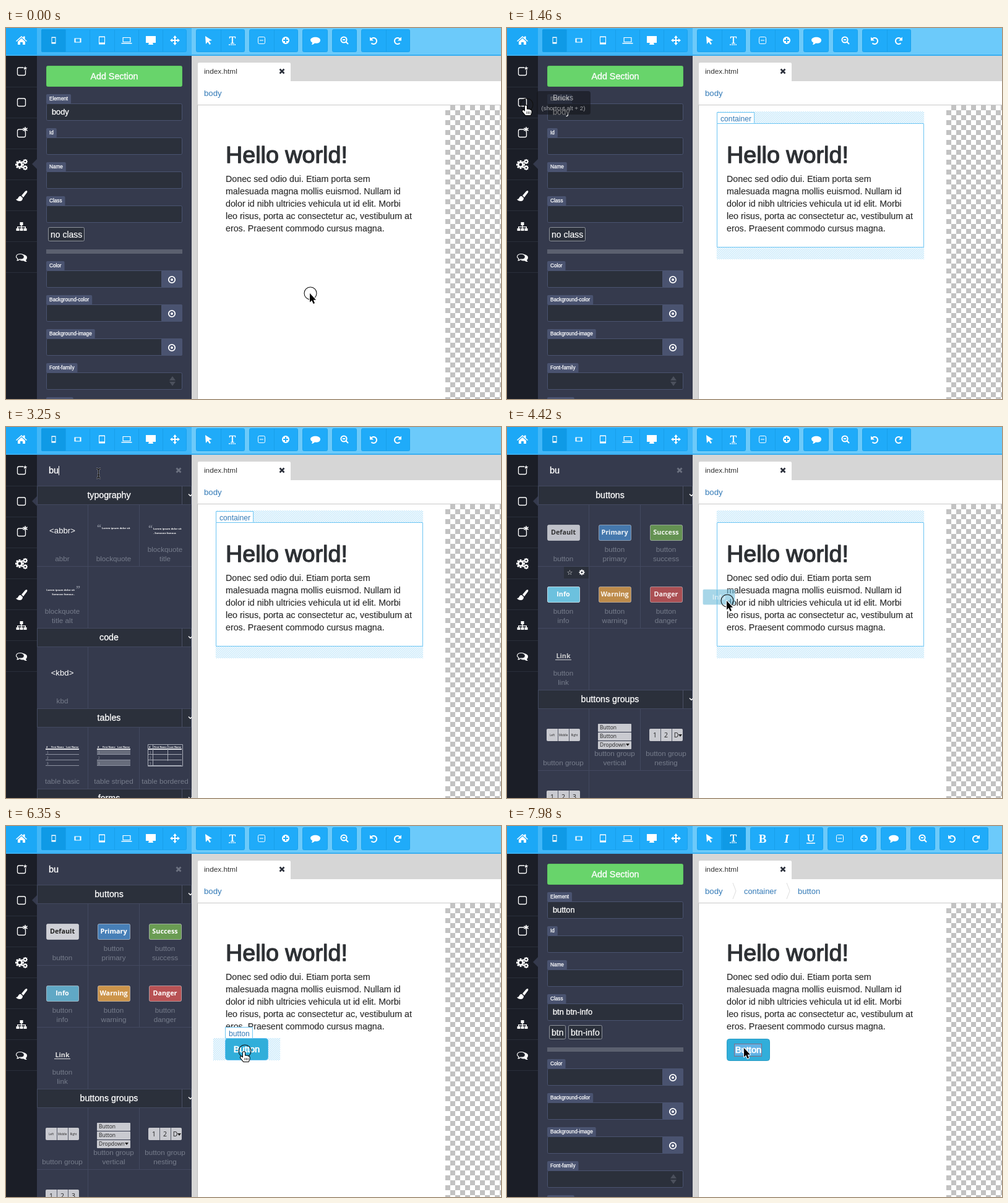
An HTML page with a canvas for the animation above (8000 ms loop, 800 px wide and 600 px high).

```html
<!DOCTYPE html>
<html lang="en">
<head>
<meta charset="utf-8">
<title>Page builder</title>
<style>
html, body { margin: 0; width: 100%; height: 100%; overflow: hidden; background: #fff; }
canvas { display: block; }
</style>
</head>
<body>
<canvas id="stage" width="800" height="600"></canvas>
<script>
const c = document.getElementById('stage').getContext('2d');
const LOOP = 8000, STEP = 147.5;
const SANS = '"Liberation Sans", Arial, sans-serif', HUMANIST = '"Open Sans", sans-serif';
const PANEL = '#353a4d', DARK = '#2b303b', EDGE = '#4a5370', SKY = '#6cc5f3', LINK = '#337ab7';

function rect(x, y, w, h, fill, stroke, radius = 0) {
  c.beginPath();
  if (stroke) c.roundRect(x + .5, y + .5, w - 1, h - 1, radius);
  else c.roundRect(x, y, w, h, radius);
  if (fill) { c.fillStyle = fill; c.fill(); }
  if (stroke) { c.strokeStyle = stroke; c.lineWidth = 1; c.stroke(); }
}
function text(s, x, y, size, color, { align = 'left', bolder = 0, font = SANS, style = '' } = {}) {
  c.font = `${style} ${size}px ${font}`;
  c.textAlign = align;
  c.fillStyle = c.strokeStyle = color;
  c.lineJoin = 'round';
  c.fillText(s, x, y);
  if (bolder) { c.lineWidth = bolder; c.strokeText(s, x, y); }
}
const center = (s, x, y, size, color, more) => text(s, x, y, size, color, { align: 'center', ...more });
const widthOf = (s, size) => { c.font = `${size}px ${SANS}`; return c.measureText(s).width; };

// Draws an SVG path at (x, y); filled unless a line width is given.
function icon(x, y, d, color = '#fff', line = 0, flip = 1) {
  c.save();
  c.translate(x, y);
  c.scale(flip, 1);
  const path = new Path2D(d);
  c.fillStyle = c.strokeStyle = color;
  c.lineWidth = line;
  c.lineJoin = 'round';
  if (line) c.stroke(path); else c.fill(path, 'evenodd');
  c.restore();
}
function disc(x, y, r, fill, line = 0) {
  c.beginPath();
  c.arc(x, y, r, 0, 7);
  c.fillStyle = c.strokeStyle = fill;
  c.lineWidth = line;
  if (line) c.stroke(); else c.fill();
}
function gear(x, y, r, hole) {
  disc(x, y, r * .72, '#fff');
  c.lineWidth = r * .42;
  c.beginPath();
  for (let i = 0; i < 8; i++) {
    const a = i * Math.PI / 4;
    c.moveTo(x, y);
    c.lineTo(x + r * Math.cos(a), y + r * Math.sin(a));
  }
  c.strokeStyle = '#fff';
  c.stroke();
  disc(x, y, r * .34, hole);
}
function hatch(x, y, w, h) {
  c.save();
  c.beginPath();
  c.rect(x, y, w, h);
  c.clip();
  c.beginPath();
  for (let s = Math.floor((x + y) / 3) * 3; s < x + y + w + h; s += 3) {
    c.moveTo(s - y, y);
    c.lineTo(s - y - h, y + h);
  }
  c.strokeStyle = SKY;
  c.lineWidth = .65;
  c.stroke();
  c.restore();
}
function nameTag(s, x, y) {
  rect(x, y, widthOf(s, 12.2) + 11, 19, '#fff', SKY);
  text(s, x + 6, y + 15, 12.2, LINK);
}

function toolbar(n) {
  rect(0, 0, 300, 45, '#42b7f8');
  rect(300, 0, 500, 45, '#6ccafa');
  rect(0, 0, 50, 45, '#1ca8f6');
  rect(0, 43, 800, 2, '#39aef0');
  const editing = n >= 52, shift = editing ? 125 : 0;
  const group = (x, w, count, active = -1) => {
    rect(x, 2, w, 37, '#1fabf9', '#18a2ee', 2);
    if (active >= 0) rect(x + active * 39, 2, 40, 37, '#0f9ae6', null, 2);
    for (let i = 1; i < count; i++) rect(Math.round(x + i * w / count), 3, 1, 35, '#189fea');
  };
  group(57, 235, 6, 0);
  group(307, 79, 2, n >= 49 ? 1 : -1);
  if (editing) group(393, 118, 3);
  [[393, 79, 2], [479, 41, 1], [527, 40, 1], [574, 79, 2]].forEach(([x, w, k]) => group(x + shift, w, k));

  icon(25, 20, 'M-9 1L0 -7L3 -4.500V-6.500H5.500V-2L9 1L8 2L0 -5L-8 2ZM-6 2L0 -3.500L6 2V7H2V3H-2V7H-6Z');
  icon(77, 20, 'M-3.500 -5.500H3.500V5.500H-3.500ZM-2.500 -4V3H2.500V-4Z');
  icon(116, 20, 'M-5.500 -3.500H5.500V3.500H-5.500ZM-3.500 -2.500V2.500H3.500V-2.500Z');
  icon(155, 20, 'M-5 -6.500H5V6.500H-5ZM-4 -5V3.500H4V-5Z');
  icon(195, 20, 'M-6.500 -5H6.500V3H-6.500ZM-5.300 -4V2H5.300V-4ZM-8.500 4H8.500V5.500H-8.500Z');
  icon(234, 20, 'M-8 -7H8V4H-8ZM-3 4H3L4 7H-4Z');
  icon(273, 20, 'M0 -8L3 -4H1V-1H4V-3L8 0L4 3V1H1V4H3L0 8L-3 4H-1V1H-4V3L-8 0L-4 -3V-1H-1V-4H-3Z');
  icon(327, 20, 'M-5 -7L6 0L1 1L4 5.500L2 7L-1 2.500L-4 6Z');
  center('T', 366, 25, 17, '#fff', { font: '"Liberation Serif", serif', bolder: .6 });
  c.setLineDash([2, 1]);
  icon(366, 27, 'M-6 0H6', '#fff', 1.5);
  c.setLineDash([]);
  if (editing) {
    const serif = { font: '"Liberation Serif", serif' };
    center('B', 413, 27, 19, '#fff', { ...serif, style: 'bold' });
    center('I', 452, 27, 19, '#fff', { ...serif, style: 'italic bold' });
    center('U', 491, 25, 17, '#fff', { ...serif, bolder: .5 });
    rect(484, 27, 14, 1.5, '#fff');
  }
  c.save();
  c.translate(shift, 0);
  rect(407, 14, 12, 12, null, '#fff', 2);
  rect(410, 19.5, 6, 1, '#fff');
  icon(452, 20, 'M-6 0A6 6 0 1 1 6 0A6 6 0 1 1 -6 0ZM-1 -4V-1H-4V1H-1V4H1V1H4V-1H1V-4Z');
  icon(500, 20, 'M-8 -.500C-8 -7 8 -7 8 -.500C8 5 2 5 -1 4.500C-3 6.500 -5 7 -6 7Q-5 5 -5 3.500Q-8 2 -8 -.500Z');
  disc(546, 19, 4.600, '#fff', 2);
  icon(546, 19, 'M-2 0H2M3.500 3.500L7 7', '#fff', 2);
  for (const [x, flip] of [[594, 1], [633, -1]]) {
    icon(x, 21, 'M-4 -3A5 5 0 1 1 -3.500 3.500', '#fff', 2, flip);
    icon(x, 21, 'M-6 -6.500V-.500H0Z', '#fff', 0, flip);
  }
  c.restore();
}

function sidebar(bricksOpen) {
  rect(0, 45, 50, 555, '#1b1e27');
  for (let y = 95; y <= 395; y += 50) rect(0, y, 50, 1, '#2a2f3a');
  for (const y of [70, 120, 170]) icon(25, y, 'M-4 -6H4Q6.500 -6 6.500 -3.500V4Q6.500 6.500 4 6.500H-4Q-6.500 6.500 -6.500 4V-3.500Q-6.500 -6 -4 -6Z', '#fff', 1.3);
  for (const y of [64, 164]) rect(28, y - 4, 7, 8, '#1b1e27');
  center('★', 31, 68, 9, '#fff', { font: '"DejaVu Sans", sans-serif' });
  icon(31, 164, 'M0 -4V4M-3.500 -2L3.500 2M-3.500 2L3.500 -2', '#fff', 1.6);
  gear(22, 221, 7, '#1b1e27');
  gear(31, 216, 4, '#1b1e27');
  gear(31, 226, 4, '#1b1e27');
  icon(25, 271, 'M8 -8Q10 -8 9 -5L3 3L0 0L6 -7ZM-1 1L2 4Q2 9 -3 9Q-7 9 -9 6Q-6 6 -5 3Q-3 0 -1 1Z');
  icon(25, 321, 'M-2.500 -7H2.500V-2H.700V0H7V3H8.500V7H3.500V3H5.500V1.300H.700V3H2.500V7H-2.500V3H-.700V1.300H-5.500V3H-3.500V7H-8.500V3H-7V0H-.700V-2H-2.500Z');
  icon(25, 371, 'M3 -5Q9 -3 9 0Q9 3 7 4Q7 6 9 7Q5 7 4 5.500Q-1 6 -3 4Q6 3 5 -1Z');
  icon(25, 371, 'M-8.500 -1C-8.500 -7 4.500 -7 4.500 -1C4.500 3 0 3.500 -3 3Q-5 5 -7 5Q-6 3 -6 2Q-8.500 1 -8.500 -1Z', '#fff', 1.2);
  icon(50, bricksOpen ? 120 : 220, 'M0 -8L-8 0L0 8Z', PANEL);
}

function settings(values) {
  rect(65, 61, 220, 34, '#68d46b', '#5cc560', 2);
  center('Add Section', 175, 83, 14.3, '#fff', { bolder: .35 });
  ['Element', 'Id', 'Name', 'Class', 'Color', 'Background-color', 'Background-image', 'Font-family', 'Font-size']
    .forEach((name, i) => {
      const y = 107 + i * 55 + (i > 3 ? 50 : 0);
      rect(65, y, widthOf(name, 8.2) + 10, 16, EDGE, null, 2);
      text(name, 70, y + 10, 8.2, '#fff', { bolder: .25 });
      rect(65, y + 15, 220, 28, DARK, EDGE, 2);
      text(values[name] || '', 74, y + 33, 12.8, '#fff', { bolder: .3 });
      if (i > 3 && i < 7) {
        rect(251, y + 15, 34, 28, EDGE, null, 2);
        disc(268, y + 30, 5.200, '#fff', 1.8);
        disc(268, y + 30, 2, '#fff');
      }
      if (i === 7) icon(269, y + 29, 'M-5 -1L0 -8L5 -1ZM-5 1L0 8L5 1Z', '#4b505c');
    });
  let x = 68;
  for (const tag of values.tags) {
    const w = Math.round(widthOf(tag, 14) + 8);
    rect(x, 322, w, 23, DARK, '#8f949c', 2);
    text(tag, x + 4, 339, 14, '#fff', { bolder: .2 });
    x += w + 4;
  }
  rect(65, 358, 220, 7, '#5b606f');
}

const bold = { font: HUMANIST, style: 'bold' };
function pill(x, y, fill, label, color = '#fff') {
  rect(Math.round(x - 26.5), Math.round(y - 12.5), 53, 26, fill, 'rgba(255,255,255,.45)', 2);
  center(label, x, y + 4, 10.8, color, bold);
}
function quote(x, y, mirrored, author) {
  const align = mirrored ? 'right' : 'left';
  text(mirrored ? '”' : '“', x + (mirrored ? 29 : -27), y, 14, '#858a98', { align, font: '"Liberation Serif", serif', style: 'bold' });
  text('Lorem ipsum dolor sit', x + (mirrored ? 20 : -19), y - 2, 4.2, '#fff', { align, ...bold });
  if (author) text(mirrored ? 'Someone famous -' : '- Someone famous', x + (mirrored ? 20 : -19), y + 5, 4, '#fff', { align, ...bold });
}
function table(x, y, kind) {
  const line = kind === 'bordered' ? '#a7abb6' : '#8c91a0';
  if (kind === 'striped') for (const dy of [-10, 7]) rect(x - 27, y + dy, 54, 9, '#676c7b');
  text('#', x - 26, y - 12, 3.8, '#fff', bold);
  text('First Name', x - 18, y - 12, 3.8, '#fff', bold);
  text('Last Name', x + 6, y - 12, 3.8, '#fff', bold);
  for (let i = 0; i < 4; i++) {
    rect(x - 27, y - 11 + i * 9, 54, i ? 1 : 2, i ? line : '#e0e1e5');
    if (i < 3) text(i + 1, x - 25, y - 3 + i * 9, 4.5, '#a5a9b5');
  }
  if (kind === 'bordered') {
    rect(x - 28, y - 18, 57, 36, null, line);
    for (const dx of [-20, 4]) rect(x + dx, y - 18, 1, dx < 0 ? 36 : 27, line);
  }
}
function segments(x, y, labels, size) {
  rect(x - 27, y - 10, 54, 20, '#c9cad0', null, 2);
  labels.forEach((s, i) => {
    if (i) rect(x - 27 + i * 18, y - 10, 1, 20, '#555a68');
    center(s, x - 18 + i * 18, y + size * .36, size, '#222', { font: HUMANIST });
  });
}
function stack(x, y) {
  ['Button', 'Button', 'Dropdown'].forEach((s, i) => {
    rect(x - 27, y - 20 + i * 14, 54, 13, '#c9cad0', null, 1);
    text(s, x - 24, y - 11 + i * 14, 8.5, '#222', { font: HUMANIST });
  });
  icon(x + 21, y + 14, 'M-3 -2H3L0 2Z', '#222');
}

const code = s => (x, y) => center(s, x, y + 2, 13.2, '#fff');
const button = (label, fill, color) => (x, y) => pill(x, y, fill, label, color);
const link = (x, y) => {
  center('Link', x, y + 4, 10.8, '#ddd', bold);
  rect(x - 13, y + 6, 26, 1, '#ddd');
};
const CATALOG = {
  b: [
    ['typography', [
      ['abbr', code('<abbr>')],
      ['blockquote', (x, y) => quote(x, y - 3)],
      ['blockquote|title', (x, y) => quote(x, y - 2, false, true)],
      ['blockquote|title alt', (x, y) => quote(x, y - 3, true, true)]]],
    ['code', [['kbd', code('<kbd>')]]],
    ['tables', ['basic', 'striped', 'bordered'].map(kind => ['table ' + kind, (x, y) => table(x, y + 1, kind)])],
    ['forms', []]],
  bu: [
    ['buttons', [
      ['button', button('Default', '#cfd0d6', '#222')],
      ['button|primary', button('Primary', '#477fb7')],
      ['button|success', button('Success', '#6a9c53')],
      ['button|info', button('Info', '#60a8c5')],
      ['button|warning', button('Warning', '#cc944a')],
      ['button|danger', button('Danger', '#b85254')],
      ['button|link', link]]],
    ['buttons groups', [
      ['button group', (x, y) => segments(x, y - 2, ['Left', 'Middle', 'Right'], 4.6)],
      ['button group|vertical', stack],
      ['button group|nesting', (x, y) => { segments(x, y - 2, ['1', '2', 'D '], 10.5); icon(x + 23, y - 1, 'M-3 -2H3L0 2Z', '#222'); }],
      ['button group|toolbar', (x, y) => segments(x, y - 2, ['1', '2', '3'], 10.5)]]]]
};

function bricks(n) {
  const query = n < 19 ? '' : n < 22 ? 'b' : 'bu';
  text(query || 'search', 69, 75, 14.5, query ? '#fff' : '#747a89', { bolder: query ? .3 : 0 });
  if (n >= 17 && n < 24) rect(Math.round(69 + widthOf(query, 14.5)), 63, 1, 15, '#fff');
  icon(279, 70, 'M-3.500 -3.500L3.500 3.500M3.500 -3.500L-3.500 3.500', '#6c7180', 2.8);
  const dragging = n >= 27 && n < 39;
  let y = 95;
  for (const [title, items] of CATALOG[n < 23 ? 'b' : 'bu']) {
    rect(50, y, 250, 31, DARK, '#434960');
    rect(284, y, 1, 30, '#4a5066');
    center(title, 166.5, y + 20, 14.2, '#fff', { bolder: .3 });
    icon(298, y + 15, 'M-3 -1.500L0 1.500L3 -1.500', '#fff', 1.4);
    y += 30;
    items.forEach(([name, draw], i) => {
      const col = i % 3, top = y + Math.floor(i / 3) * 100, x = 91 + col * 83;
      const info = name === 'button|info';
      if (col < 2) rect(132 + col * 83, top, 1, 100, '#434960');
      if (!col) rect(50, top + 100, 250, 1, '#434960');
      c.globalAlpha = dragging && !info && title === 'buttons' ? .9 : 1;
      draw(x, top + 45);
      c.globalAlpha = 1;
      if (info && n >= 26 && n < 39) {
        pill(x, top + 45, '#6cc1de', 'Info');
        rect(92, top + 1, 40, 19, DARK);
        center('☆', 101.5, top + 14, 11, '#fff', { font: '"DejaVu Sans", sans-serif' });
        gear(121, top + 10, 4.5, DARK);
      }
      const lines = name.split('|');
      lines.forEach((s, k) => center(s, x, top + 92 - 15 * (lines.length - 1 - k), 11.7, '#767c8b'));
    });
    y += Math.ceil(items.length / 3) * 100;
  }
}

function page(n, selected) {
  rect(300, 45, 500, 41, '#d6d6d6');
  rect(300, 86, 10, 514, '#d6d6d6');
  rect(310, 86, 490, 514, '#fff');
  rect(310, 56, 150, 31, '#fff', null, [2, 2, 0, 0]);
  text('index.html', 320, 74, 11.8, '#333');
  icon(446, 70, 'M-3.500 -3.500L3.500 3.500M3.500 -3.500L-3.500 3.500', '#2b303b', 2.6);
  text('body', 320, 110, 13.2, LINK);
  if (selected) {
    text('container', 383, 110, 12.8, LINK);
    text('button', 470, 110, 13, LINK);
    for (const x of [365, 452]) icon(x, 105, 'M0 -13L5 0L0 13', '#ddd', 1);
  }
  rect(309, 124, 491, 1, '#c9c9c9');
  rect(309, 125, 1, 475, '#bdbdbd');
  c.save();
  c.beginPath();
  c.rect(710, 125, 90, 475);
  c.clip();
  for (let row = 0; row < 60; row++)
    for (let col = 1 - row % 2; col < 12; col += 2) rect(710 + col * 8, 125 + row * 8, 8, 8, '#c2c2c2');
  c.restore();

  text('Hello world!', 355, 218, 37.7, '#2e3135', { bolder: 1.3 });
  ['Donec sed odio dui. Etiam porta sem', 'malesuada magna mollis euismod. Nullam id',
    'dolor id nibh ultricies vehicula ut id elit. Morbi', 'leo risus, porta ac consectetur ac, vestibulum at',
    'eros. Praesent commodo cursus magna.']
    .forEach((s, i) => text(s, 355, 249 + i * 20, 14.25, '#2c2c2c', { bolder: .15 }));

  if (n >= 3 && n < 39) rect(339, 154, 335, 201, null, SKY);
  if (n >= 3 && n < 32) {
    hatch(339, 135, 335, 19);
    hatch(339, 355, 335, 19);
    if (n < 29) nameTag('container', 339, 136);
  }
  if (n >= 32 && n < 39) {
    hatch(354, 214, 305, 19);
    hatch(354, 335, 305, 19);
    rect(354, 233, 305, 102, null, '#b0306f');
    nameTag('paragraph', 354, 215);
  }
  if (n >= 39) insertedButton(n);
}

function insertedButton(n) {
  const hovered = n >= 41 && n < 49, x = hovered ? 354 : 355, y = hovered ? 343 : 344;
  if (hovered) {
    hatch(335, 343, 19, 36);
    hatch(424, 343, 19, 36);
  }
  rect(x, y, 70, 36, '#31aeda', hovered ? '#5cbdf2' : '#2a9cc4', 4);
  if (n >= 52) {
    rect(368, 353, 43, 18, '#62b2e6');
    c.setLineDash([1, 1]);
    rect(367, 352, 45, 21, null, '#e03030');
    c.setLineDash([]);
  }
  center('Button', x + 35, y + 23, 14.7, '#fff', { bolder: .7 });
  if (hovered) nameTag('button', 354, 325);
}

// Keyframes: [step, x, y]
const POINTER = [[0, 492, 429], [9, 32, 124], [12, 32, 124], [17, 149, 75], [22, 149, 75], [26, 95, 270], [27, 95, 270],
  [30, 356, 281], [37, 405, 350], [39, 405, 350], [43, 386, 364], [48, 386, 364], [49, 384, 359], [55, 384, 359]];
const GHOST = [[27, 69, 258], [30, 316, 262], [37, 384, 333], [39, 384, 333]];
function along(track, n) {
  const i = track.findIndex(k => k[0] > n);
  const [a, ax, ay] = track[i - 1], [b, bx, by] = track[i];
  const u = (n - a) / (b - a), e = u * u * (3 - 2 * u);
  return [ax + (bx - ax) * e, ay + (by - ay) * e];
}
const ARROW = 'M-1 0V14.500L2.300 11.500L4.700 17L7 16L4.700 10.800H9Z';
const HAND = 'M-3 2Q-1.500 .500 0 2V8Q1.500 6.500 2.500 8Q4 7 5 8.500Q7 8 7.500 10V13L6 17H-2L-7 11Q-7 8.500 -5 9L-3 11Z';
const BEAM = 'M-3.500 -7.500H-1.500L0 -6L1.500 -7.500H3.500M0 -6V6M-3.500 7.500H-1.500L0 6L1.500 7.500H3.500M-2 2.500H2';

function pointer(n) {
  const [x, y] = along(POINTER, n);
  const beam = n >= 15 && n <= 23;
  const hand = n >= 9 && n <= 14 || n >= 25 && n <= 27 || n >= 41 && n < 49;
  if (beam) {
    icon(x + .5, y, BEAM, 'rgba(255,255,255,.5)', 2.4);
    icon(x + .5, y, BEAM, '#000', 1.1);
    return;
  }
  if (n < 49) disc(x, y, 10, '#111', 1.1);
  icon(x, y, hand ? HAND : ARROW, hand ? '#000' : '#fff', 2);
  icon(x, y, hand ? HAND : ARROW, hand ? '#fff' : '#000');
  if (hand) icon(x, y, 'M0 11V15M2.500 11V15M5 11V15', '#000', .8);
  if (n >= 32 && n < 39) {
    disc(x + 8, y + 21, 9, '#4ba52c');
    icon(x + 8, y + 21, 'M-4 0H4M0 -4V4', '#fff', 2.2);
  }
}

function tooltip(alpha) {
  c.globalAlpha = alpha;
  rect(48, 102, 87, 38, '#14161c', null, 4);
  center('Bricks', 90.5, 117, 12.2, '#fff');
  center('(shortcut alt + 2)', 91, 133, 9.8, '#fff');
  c.globalAlpha = 1;
}

function draw(ms) {
  const n = Math.min(54, Math.floor((ms + 17) / STEP));
  const bricksOpen = n >= 11 && n < 45, selected = n >= 45;
  page(n, selected);
  c.save();
  c.beginPath();
  c.rect(0, 45, 300, 555);
  c.clip();
  rect(50, 45, 250, 555, PANEL);
  if (bricksOpen) bricks(n);
  else settings(selected
    ? { Element: 'button', Class: 'btn btn-info', tags: ['btn', 'btn-info'] }
    : { Element: 'body', tags: ['no class'] });
  sidebar(bricksOpen);
  c.restore();
  toolbar(n);
  if (n >= 10 && n < 13) tooltip(n === 10 ? .6 : .85);
  if (n >= 27 && n < 39) {
    const [x, y] = along(GHOST, n);
    c.globalAlpha = .58;
    pill(x + 26.5, y + 12.5, '#68b9d8', 'Info');
    c.globalAlpha = 1;
  }
  pointer(n);
}

const start = performance.now();
function tick() {
  draw((performance.now() - start) % LOOP);
  requestAnimationFrame(tick);
}
tick();
</script>
</body>
</html>
```
